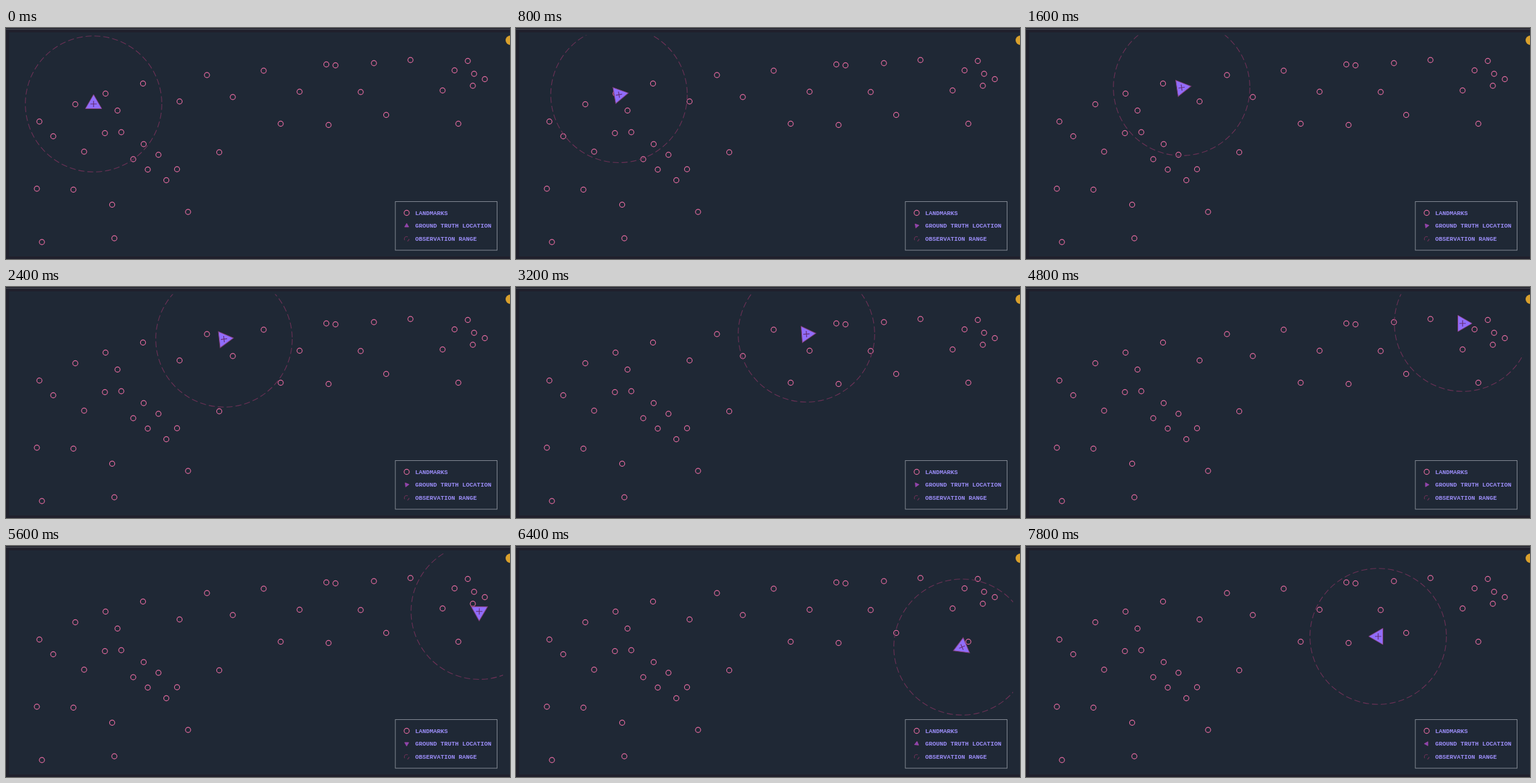
An HTML page for the animation above (8 s loop, 800 by 368 pixels).

```html
<!DOCTYPE html>
<html lang="en">
<head>
<meta charset="utf-8">
<title>Vehicle among landmarks</title>
<style>
  html, body { margin: 0; width: 100%; height: 100%; overflow: hidden; background: #20202c; }
  svg { display: block; width: 100%; height: 100%; }
  .landmark { fill: none; stroke: #ea6ca2; stroke-width: 1.15; }
  .range { fill: none; stroke: #6f3157; stroke-width: 1.1; stroke-dasharray: 9.6 4.6; }
  .vehicle { fill: #906dfb; stroke: #843e7c; }
  .cross { fill: none; stroke: #642c72; stroke-width: 1.2; }
  .key { fill: #8446b4; stroke: #a844a0; stroke-width: .8; }
  text { font: bold 9.6px "Liberation Mono", "Courier New", monospace; fill: #9b8df8; }
</style>
</head>
<body>
<svg viewBox="0 0 800 368">
  <defs>
    <clipPath id="plot"><rect x="10" y="11.5" width="779" height="345"/></clipPath>
  </defs>
  <rect width="800" height="368" fill="#20202c"/>
  <rect y="1" width="800" height="2" fill="#393b44"/>
  <rect x="5" y="7" width="795" height="357" fill="#1f2835"/>
  <circle cx="800.5" cy="19.5" r="7.5" fill="#d9a02c"/>
  <g clip-path="url(#plot)">
    <g id="landmarks"></g>
    <circle id="range" class="range" r="108.3"/>
    <g id="vehicle">
      <path class="vehicle" d="M15 0L-7.5 -13V13Z"/>
      <path class="cross" d="M-5 0H5M0 -5V5"/>
    </g>
  </g>
  <rect x="618" y="276.5" width="161.5" height="77.5" fill="#1f2835" stroke="#858b96"/>
  <circle class="landmark" cx="636" cy="294.5" r="4.1"/>
  <path id="key" class="key" d="M3.8 0L-2 -3.3V3.3Z"/>
  <circle class="range" cx="636" cy="336" r="3.7" stroke-dashoffset="5"/>
  <text x="649.5" y="297.5">LANDMARKS</text>
  <text x="649.5" y="318.3">GROUND TRUTH LOCATION</text>
  <text x="649.5" y="339.1">OBSERVATION RANGE</text>
</svg>
<script>
const STEP = 200, LOOP = 8000;
const $ = id => document.getElementById(id);

// Surveyed map: x,y of each landmark
const landmarks = `
  53,149 75,172.5 110,121.5 124,197 158,104.5 177,131.5 157,167.5 183,166
  217.5,88.5 218.5,185 202,209 225,225.5 242,202 254.5,242.5 271.5,225
  275.5,117 319,75 338.5,198 360,110 409,68 436,152.5 466,101.5 508.5,58
  523,59.5 512,154.5 563,102 584,56 603.5,138.5 642,51 693,99.5 712,67.5
  733,52.5 743,73 760,81.5 741,92 718,152.5 49,256 107,257.5 168.5,281.5
  289,293 57,341 172,335`.trim().split(/\s+/).map(p => p.split(","));

// Key poses: step, x, y, heading in degrees (clockwise from right)
const route = [
  [0, 139, 121, -90],
  [4, 163.5, 106.2, -10],
  [8, 247, 95, -8.5],
  [12, 346, 83, -6.5],
  [16, 461, 75, -4.5],
  [24, 693, 58, 0],
  [27, 751, 88, 72],
  [30, 733, 131.5, 128],
  [32, 708, 161, 157],
  [39, 559, 144, 180]
].map(([n, x, y, angle]) => ({ n, x, y, angle }));

// Velocity at each pose: mean speed over the neighbouring legs, along the heading
const gap = (a, b) => Math.hypot(b.x - a.x, b.y - a.y);
route.forEach((p, i) => {
  const before = route[i - 1] || p, after = route[i + 1] || p;
  const speed = (gap(before, p) + gap(p, after)) / (after.n - before.n);
  const rad = p.angle * Math.PI / 180;
  p.vx = speed * Math.cos(rad);
  p.vy = speed * Math.sin(rad);
});

function hermite(p, m, q, n, u) {
  const v = 1 - u;
  return p * (1 + 2 * u) * v * v + m * u * v * v + q * u * u * (3 - 2 * u) - n * u * u * v;
}

function poseAt(step) {
  const i = Math.max(1, route.findIndex(p => p.n >= step));
  const a = route[i - 1], b = route[i];
  const span = b.n - a.n, u = (step - a.n) / span;
  return {
    x: hermite(a.x, a.vx * span, b.x, b.vx * span, u),
    y: hermite(a.y, a.vy * span, b.y, b.vy * span, u),
    angle: a.angle + (b.angle - a.angle) * u
  };
}

function render(ms) {
  const { x, y, angle } = poseAt(Math.floor(ms % LOOP / STEP));
  $("range").setAttribute("transform", `translate(${x} ${y})`);
  $("vehicle").setAttribute("transform", `translate(${x} ${y}) rotate(${angle})`);
  $("key").setAttribute("transform", `translate(636 315) rotate(${angle})`);
}

$("landmarks").innerHTML = landmarks
  .map(([x, y]) => `<circle class="landmark" cx="${x}" cy="${y}" r="4.1"/>`).join("");

const start = performance.now();
function tick() {
  render(performance.now() - start);
  requestAnimationFrame(tick);
}
tick();
</script>
</body>
</html>
```
